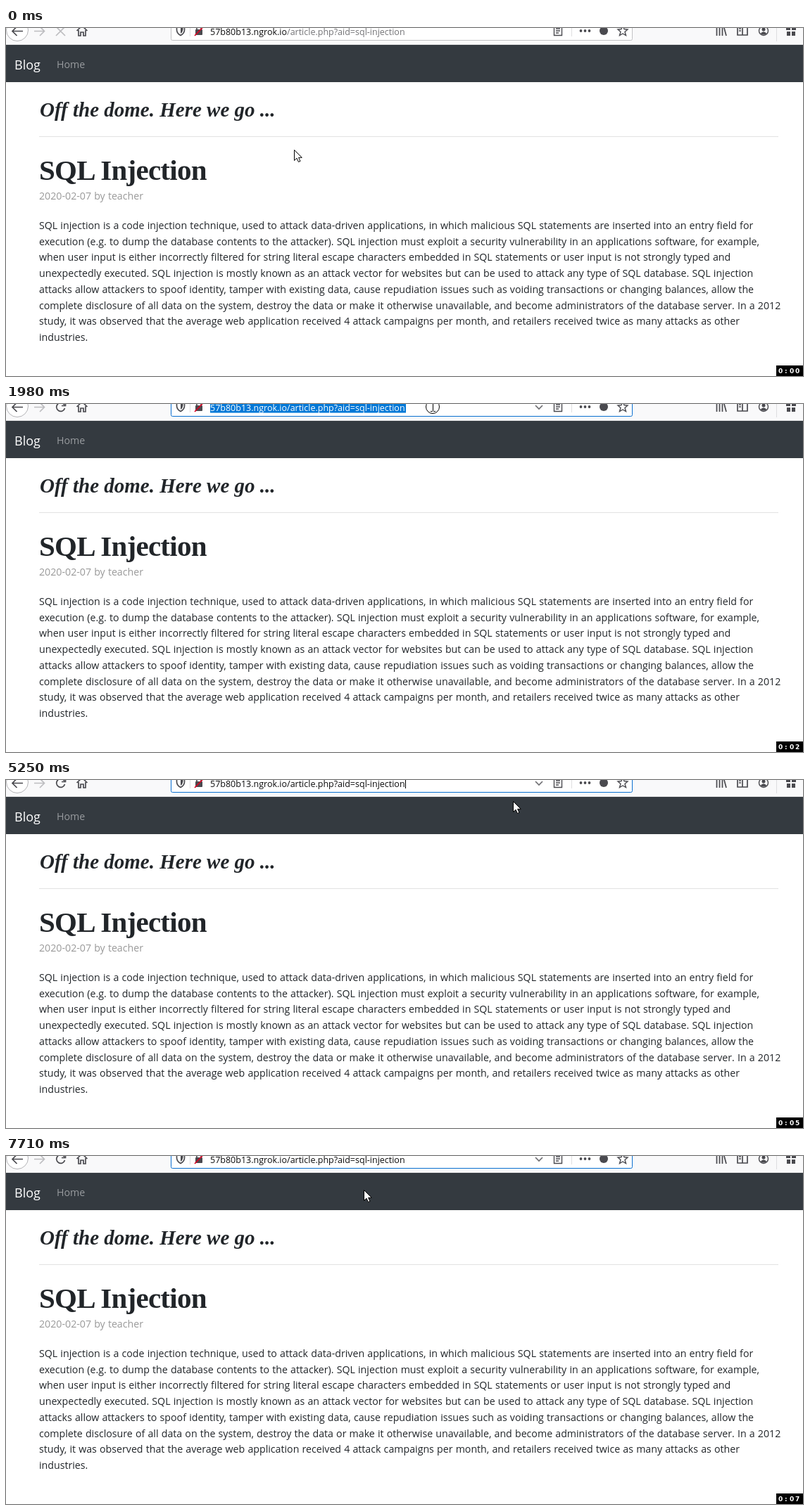
Animation of 1132 by 495 pixels, one loop 7.99 s. Source, as an HTML page:

```html
<!DOCTYPE html>
<html lang="en">
<head>
<meta charset="utf-8">
<title>Blog</title>
<style>
  html, body { margin: 0; width: 100%; height: 100%; overflow: hidden; background: #fff; }
  svg { display: block; width: 1132px; height: 495px; }
  text { font-family: "Open Sans", "Noto Sans", sans-serif; font-size: 14.2px; fill: #212529; white-space: pre; }
  .body { word-spacing: .47px; }
  .serif { font-family: "Liberation Serif", serif; font-weight: bold; }
  .url { font-size: 12.5px; fill: #0c0c0d; }
  .clock { font: bold 9px "DejaVu Sans", sans-serif; fill: #fff; }
  .icon { fill: none; stroke: #4a4a4f; stroke-width: 1.7; }
  .solid { fill: #4a4a4f; stroke: none; }
  .dim { stroke: #bdbdc0; }
</style>
</head>
<body>
<svg viewBox="0 0 1132 495">
  <!-- browser toolbar -->
  <rect width="1132" height="24" fill="#f9f9fa"/>
  <path d="M0 23.5H1132" stroke="#e3e3e5"/>
  <circle cx="16" cy="3" r="15.5" fill="#fff" stroke="#b5b5b8"/>
  <rect id="field" x="234.5" y="-14.5" width="655" height="32" rx="2" fill="#fff"/>
  <g class="icon">
    <path d="M24 4.5H10M15.5 -2L9 4.5L15.5 11"/>
    <path class="dim" d="M40 4.5H54M48 -2L54.5 4.5L48 11"/>
    <path id="stop" class="dim" d="M71 -2L84 11M84 -2L71 11"/>
    <path id="reload" d="M83 1.5A6 6 0 1 0 83.5 6M84.5 -3V2.5H79"/>
    <path d="M100.5 4L108 -3L115.5 4M103 3V11H106V6H110V11H113V3"/>
    <path d="M242.5 -3V3Q243 8 248 10.5Q253 8 253.500 3V-3"/>
    <path class="solid" d="M248 -2V8Q251 6 251.500 2V-2Z"/>
    <rect class="solid" x="269" y="2" width="10" height="8" rx="1"/>
    <path d="M271 3V-2H277V3"/>
    <path d="M268 11L280.500 -2" stroke="#d70022"/>
    <path id="chevron" d="M752 2L757 7L762 2" stroke="#707074"/>
    <path d="M778.500 -4V10.500H789.500V-4M781 1H787M781 4H787M781 7H785" stroke-width="1.4"/>
    <path d="M261.500 0V12M803.500 0V12M1094.500 0V19" stroke="#dedee0" stroke-width="1"/>
    <g class="solid">
      <circle cx="816.500" cy="4" r="1.900"/><circle cx="822.500" cy="4" r="1.900"/><circle cx="828.500" cy="4" r="1.900"/>
      <circle cx="849" cy="4" r="6"/>
      <circle cx="1076" cy="2" r="2.500"/><path d="M1071.500 8Q1076 2.500 1080.500 8Q1076 11 1071.500 8Z"/>
      <path d="M1108 -1H1114V3H1108ZM1116 -1H1122V3H1116ZM1109 5H1114V11H1109ZM1116 5H1121V11H1116Z"/>
    </g>
    <path d="M876 -4L878 1.500L883 2L879 5.500L880.500 10.500L876 8L871.500 10.500L873 5.500L869 2L874 1.500Z" stroke-width="1.400"/>
    <path d="M1009.500 -3V11M1013.500 -3V11M1017.500 -3V11M1019.500 -2L1023 11"/>
    <path d="M1039 -3V10H1053V-3M1046 -3V10M1041 1H1044M1041 4H1044"/>
    <circle cx="1076" cy="4" r="6.500" stroke-width="1.400"/>
  </g>
  <rect id="selection" x="290" width="278" height="12.500" fill="#0078d7"/>
  <text id="address" class="url" x="290" y="9.500">57b80b13.ngrok.io<tspan id="path">/article.php?aid=sql-injection</tspan></text>
  <path id="caret" d="M567.500 0V12" stroke="#000"/>

  <!-- page -->
  <rect y="24" width="1132" height="53" fill="#343a40"/>
  <text x="12" y="58.500" style="font-size:18px;fill:#fff">Blog</text>
  <text x="72" y="57" style="fill:#999c9f">Home</text>
  <text class="serif" x="48" y="126" style="font-size:29px;font-style:italic">Off the dome. Here we go ...</text>
  <path d="M47 154.500H1097" stroke="#e2e2e2"/>
  <text class="serif" x="47" y="215.500" style="font-size:41px;letter-spacing:-.72px">SQL Injection</text>
  <text class="body" x="47" y="244" style="fill:#999">2020-02-07 by teacher</text>
  <g id="article"></g>

  <!-- elapsed time -->
  <rect x="1094" y="480" width="38" height="15" fill="#000"/>
  <text id="clock" class="clock" x="1097 1106 1113 1121" y="490.500"></text>

  <!-- pointers -->
  <path id="arrow" d="M.5 .5V15.500L4 12.200L6.500 17.500L9 16.400L6.600 11.300H11.300Z" fill="#fff" stroke="#000"/>
  <g id="beam" fill="none" stroke="#000">
    <path d="M603 -3.500H605.500L606.500 -2.500L607.500 -3.500H610M606.500 -2.500V9.500M603 10.500H605.500L606.500 9.500L607.500 10.500H610"/>
    <circle id="ring" cx="606" cy="4" r="9.500"/>
  </g>
</svg>
<script>
const LOOP = 7990;
const $ = id => document.getElementById(id);
const show = (id, on) => $(id).setAttribute("visibility", on ? "visible" : "hidden");
const between = (t, start, end) => t >= start && t < end;
const passed = (times, t) => times.filter(time => time <= t).length;

const paragraph = `SQL injection is a code injection technique, used to attack data-driven applications, in which malicious SQL statements are inserted into an entry field for
execution (e.g. to dump the database contents to the attacker). SQL injection must exploit a security vulnerability in an applications software, for example,
when user input is either incorrectly filtered for string literal escape characters embedded in SQL statements or user input is not strongly typed and
unexpectedly executed. SQL injection is mostly known as an attack vector for websites but can be used to attack any type of SQL database. SQL injection
attacks allow attackers to spoof identity, tamper with existing data, cause repudiation issues such as voiding transactions or changing balances, allow the
complete disclosure of all data on the system, destroy the data or make it otherwise unavailable, and become administrators of the database server. In a 2012
study, it was observed that the average web application received 4 attack campaigns per month, and retailers received twice as many attacks as other
industries.`;
$("article").innerHTML = paragraph.split("\n").map((line, i) =>
  `<text class="body" x="47" y="${286 + i * 22.7}">${line}</text>`).join("");

// Pointer positions, each held until the next: [ms, x, y]
const pointer = [
  [0, 409, 173], [120, 440, 150], [240, 520, 80], [360, 588, 25],
  [5250, 720, 30], [5370, 1000, 100], [5490, 1120, 126], [5640, 1124, 105],
  [5760, 1121, 78], [5870, 1117, 54], [5980, 1113, 41], [6100, 1078, 65],
  [6250, 1050, 62], [6550, 900, 60], [6690, 760, 58], [6810, 640, 56],
  [6930, 540, 54], [7040, 466, 51], [7160, 433, 52], [7310, 328, 54],
  [7440, 502, 48], [7590, 501, 48], [7710, 508, 48]
];
const seconds = [990, 1980, 3030, 3980, 4970, 5980, 7040];
const blinks = [2100, 2250, 2750, 3300, 3830, 4360, 4820, 5370, 5870, 6550, 7160, 7590];

function draw(t) {
  const focused = t >= 990;
  const selected = between(t, 990, 2100);
  const overField = between(t, 510, 5250);

  show("stop", t < 120);
  show("reload", t >= 120);
  $("reload").classList.toggle("dim", t < 510);
  show("chevron", t >= 510);

  $("field").setAttribute("stroke", focused ? "#0a6fd0" : "#c2c2c5");
  show("selection", selected);
  $("address").style.fill = selected ? "#fff" : "#0c0c0d";
  $("path").style.fill = selected ? "#fff" : focused ? "#0c0c0d" : "#737376";
  show("caret", passed(blinks, t) % 2);

  const [, x, y] = pointer.findLast(([time]) => time <= t);
  $("arrow").setAttribute("transform", `translate(${x} ${y})`);
  show("arrow", !overField);
  show("beam", overField);
  show("ring", between(t, 870, 1230) || between(t, 1880, 2100));
  $("clock").textContent = "0:0" + passed(seconds, t);
}

function tick() {
  draw(performance.now() % LOOP);
  requestAnimationFrame(tick);
}
tick();
</script>
</body>
</html>
```
